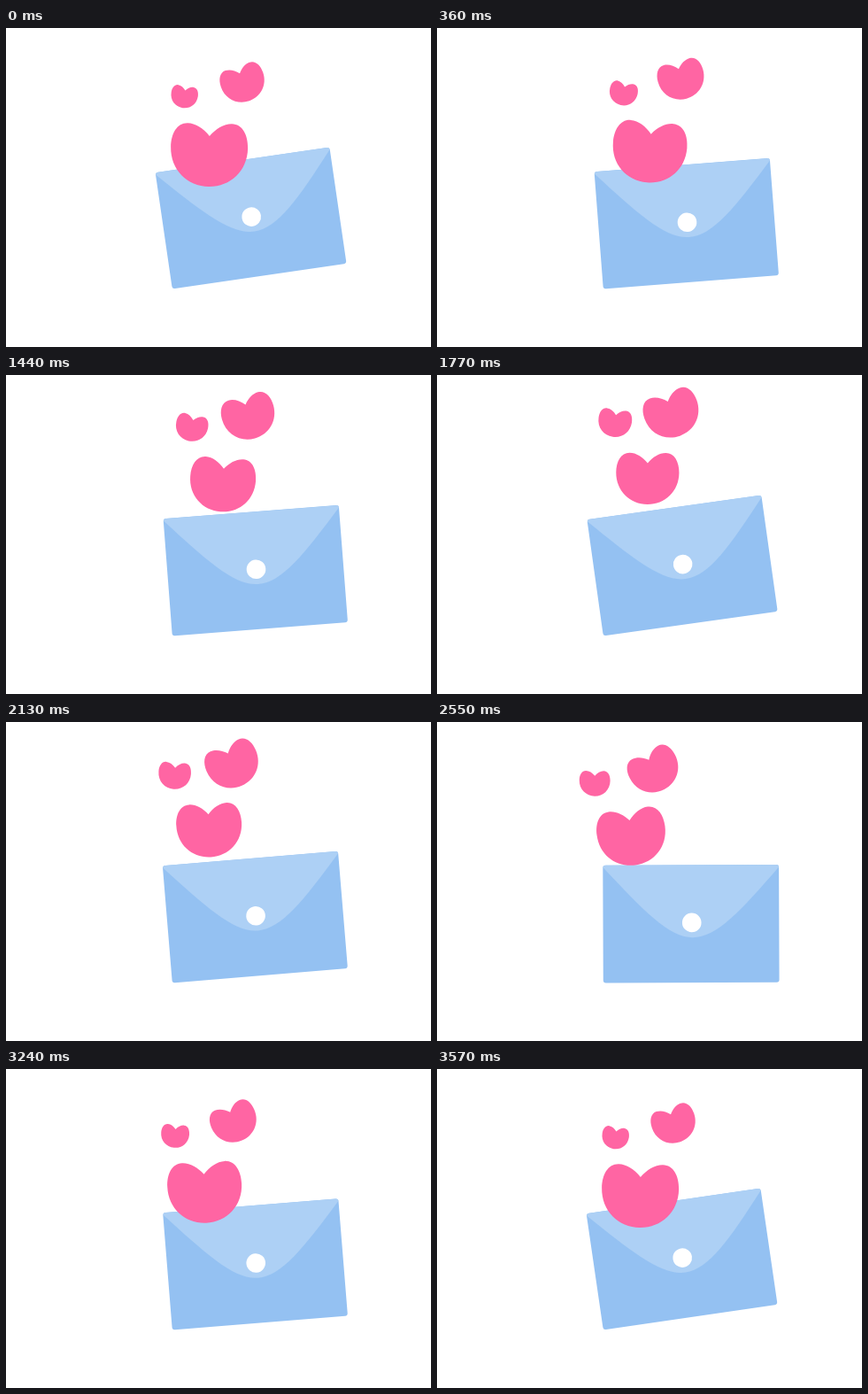
Recreate the animation shown at these times as an HTML page with a canvas. Size 480 by 360 pixels, loop 3600 ms.

```html
<!DOCTYPE html>
<html lang="en">
<head>
<meta charset="utf-8">
<title>Love letter</title>
<style>
  html, body { margin: 0; width: 100%; height: 100%; overflow: hidden; background: #fff; }
  canvas { display: block; width: 480px; height: 360px; }
</style>
</head>
<body>
<canvas id="stage" width="480" height="360"></canvas>
<script>
const ctx = document.getElementById('stage').getContext('2d');
const LOOP = 3600, STEP = 30;
const KEY_TIMES = [0, 900, 1800, 2700, 3570];
const COLORS = { heart: '#ff65a3', body: '#94c1f2', flap: '#add0f5', button: '#fff' };

// Four poses; the loop closes on the first one.
const ENVELOPE_TILT = [-8.3, 1.4, -8.3, 1.4];
const HEART_SWING = [0, 10, -1, -10];
const HEARTS = [
  { x: [229.5, 255.7, 237.2, 216.5], y: [143, 135, 116, 132.4], tilt: 1, scale: 1, peak: 0.815 },
  { x: [268, 288.6, 265, 241.9], y: [62.6, 52.6, 44, 57.2], tilt: -19, scale: 0.577, peak: 0.721 },
  { x: [201.3, 223.8, 200, 173.8], y: [77.7, 68.6, 53.7, 72.3], tilt: 9, scale: 0.35, peak: 0.437 }
];

function tween(values, t) {
  let i = 0;
  while (i < 3 && t >= KEY_TIMES[i + 1]) i++;
  const k = Math.min(1, (t - KEY_TIMES[i]) / (KEY_TIMES[i + 1] - KEY_TIMES[i]));
  return values[i] + (values[(i + 1) % 4] - values[i]) * k;
}

function placed(x, y, degrees, scale, draw) {
  ctx.save();
  ctx.translate(x, y);
  ctx.rotate(degrees * Math.PI / 180);
  ctx.scale(scale, scale);
  draw();
  ctx.restore();
}

function fill(color, path) {
  ctx.fillStyle = color;
  ctx.fill(path);
}

const bodyShape = new Path2D();
bodyShape.roundRect(-0.2, -132.5, 198.8, 132.6, 3);

const flapShape = new Path2D(
  'M3 -132.5 H195.5 Q198.6 -132.5 198.6 -130 C155 -80 128 -50.7 101 -50.7 C74 -50.7 45 -82 0 -130 Q0 -132.5 3 -132.5 Z');

const buttonShape = new Path2D();
buttonShape.arc(100, -67.5, 10.8, 0, Math.PI * 2);

const heartShape = new Path2D(
  'M0 -21 C-7 -29.5 -16 -35.2 -25 -35.2 C-37 -35.2 -43.5 -23 -43.5 -8 C-43.5 18 -24 36 0 36 ' +
  'C24 36 43.5 18 43.5 -8 C43.5 -23 37 -35.2 25 -35.2 C16 -35.2 7 -29.5 0 -21 Z');

function drawEnvelope() {
  fill(COLORS.body, bodyShape);
  fill(COLORS.flap, flapShape);
  fill(COLORS.button, buttonShape);
}

function render(t) {
  ctx.fillStyle = '#fff';
  ctx.fillRect(0, 0, 480, 360);
  placed(188, 294.3, tween(ENVELOPE_TILT, t), 1, drawEnvelope);
  for (const { x, y, tilt, scale, peak } of HEARTS) {
    const middle = (scale + peak) / 2;
    placed(tween(x, t), tween(y, t), tilt + tween(HEART_SWING, t),
      tween([scale, middle, peak, middle], t), () => fill(COLORS.heart, heartShape));
  }
}

const start = performance.now();
function tick() {
  const t = (performance.now() - start) % LOOP;
  render(Math.floor(t / STEP) * STEP);
  requestAnimationFrame(tick);
}
tick();
</script>
</body>
</html>
```
